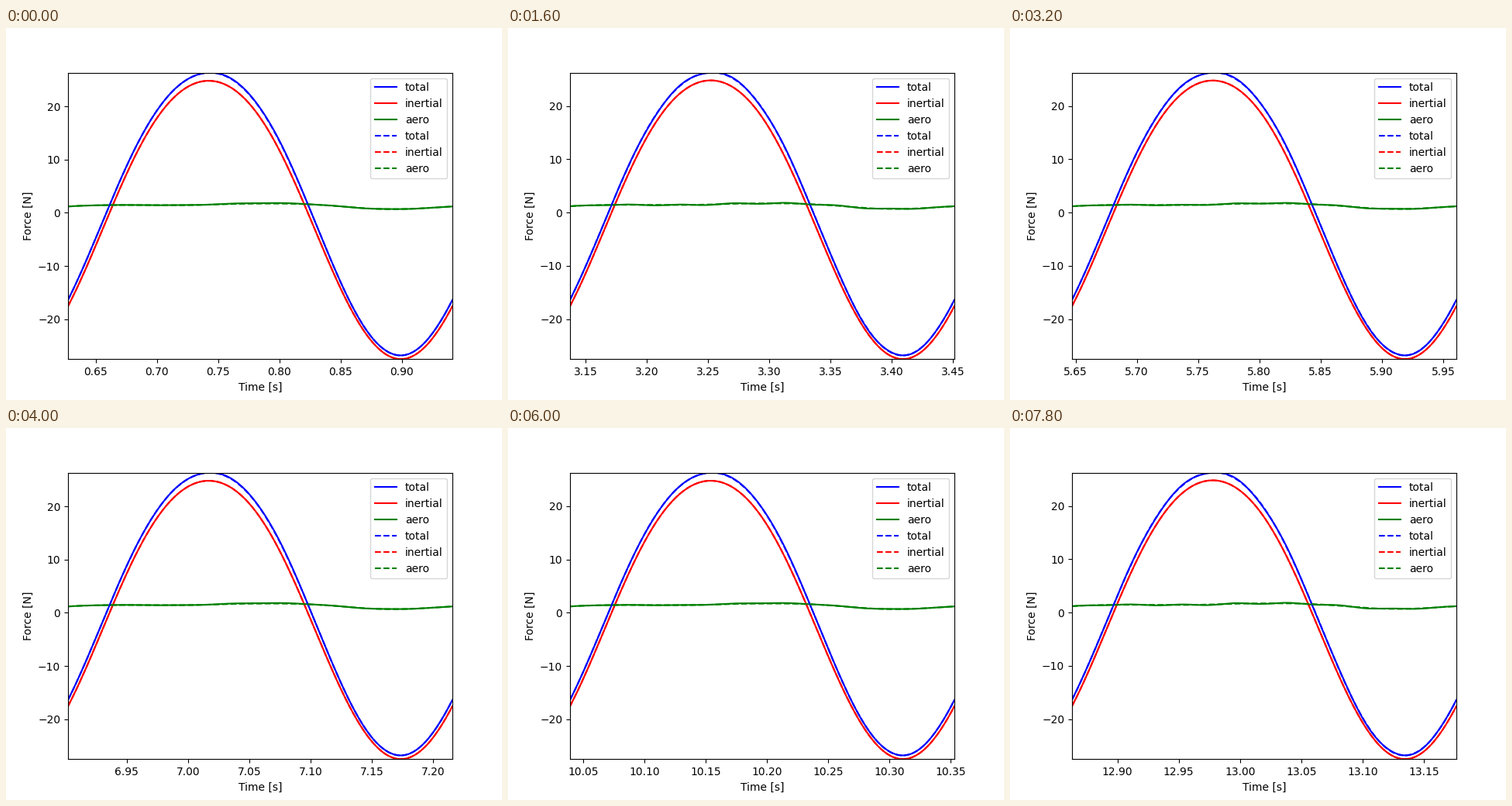
Animation of 640x480 px, one loop 8000 ms. Source, as a matplotlib script:

```python
import numpy as np
import matplotlib.pyplot as plt
from matplotlib.animation import FuncAnimation

PERIOD = 0.31373   # one flapping cycle [s]
FIRST = 2          # first cycle on show
CYCLES = 40
COLORS = {"total": "b", "inertial": "r", "aero": "g"}

phase = np.linspace(0, 1, 201)


def periodic(values, p):
    """Trigonometric interpolation through equally spaced values."""
    n = len(values)
    coef = np.fft.rfft(values) / n
    coef[1:n // 2] *= 2
    return sum((c * np.exp(2j * np.pi * h * p)).real
               for h, c in enumerate(coef))


theta = 2 * np.pi * (phase - 0.366)
inertial = (26.35 * np.cos(theta) - 1.35 * np.cos(2 * theta)
            - 0.2 * np.cos(3 * theta))
aero = periodic([1.18, 1.42, 1.45, 1.42, 1.46, 1.63,
                 1.72, 1.69, 1.42, 0.95, 0.68, 0.82], phase)


def measured_aero(cycle):
    """Smooth model plus a ripple whose strength beats between cycles."""
    beat = np.cos(2 * np.pi * 0.296 * cycle)
    envelope = np.sqrt(np.abs(np.sin(np.pi * phase)))
    ripple = np.cos(2 * np.pi * 7.3 * (phase - 0.2863))
    bump = np.exp(-((phase - 0.51) / 0.12) ** 2)
    return (aero + (0.07 - 0.045 * beat) * envelope * ripple
            + 0.05 * (1 + beat) * bump)


fig, ax = plt.subplots(figsize=(6.4, 4.8), dpi=100)
ax.set_xlabel("Time [s]")
ax.set_ylabel("Force [N]")
solid = [ax.plot([], [], c, label=name)[0] for name, c in COLORS.items()]
dashed = [ax.plot([], [], c + "--", label=name)[0]
          for name, c in COLORS.items()]
ax.legend(loc="upper right")


def update(cycle):
    t = (cycle + FIRST + phase) * PERIOD
    drag = measured_aero(cycle)
    total = inertial + drag
    for line, force in zip(solid, (total, inertial, drag)):
        line.set_data(t, force)
    for line, force in zip(dashed, (inertial + aero, inertial, aero)):
        line.set_data(t, force)
    ax.set_xlim(t[0], t[-1])
    ax.set_ylim(inertial.min(), total.max())
    return solid + dashed


anim = FuncAnimation(fig, update, frames=CYCLES, interval=200,
                     repeat=True, repeat_delay=0)
plt.show()
```
